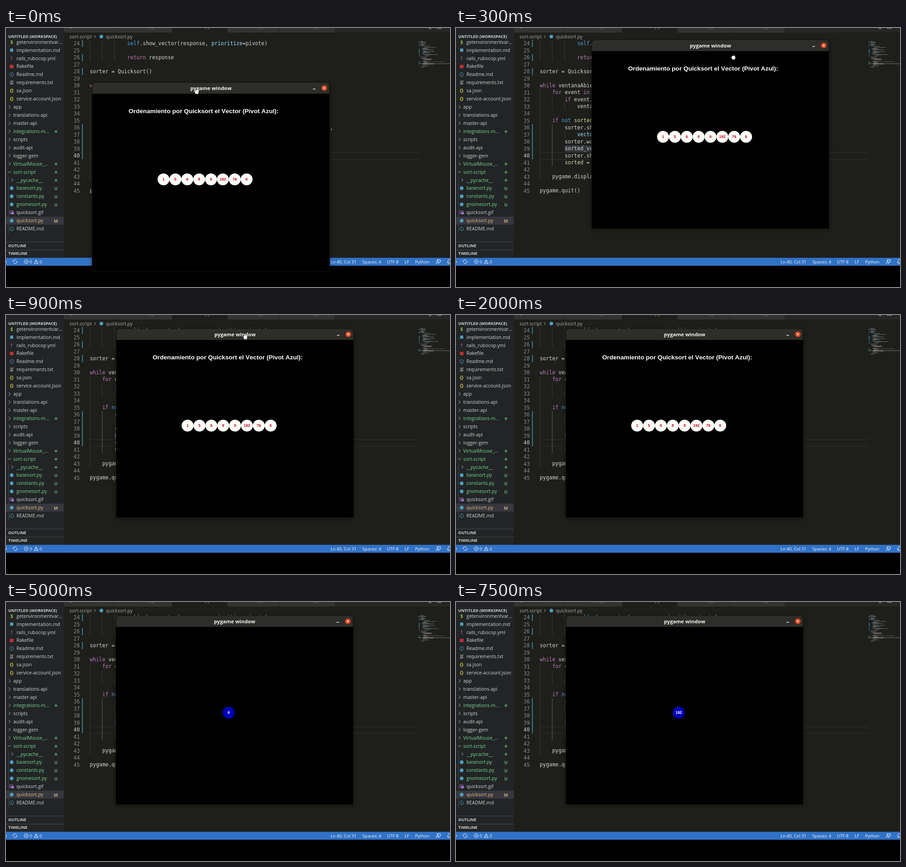
These frames come from a looping animation (978 px wide and 572 px high, 8 s). An HTML page with a canvas:

```html
<!DOCTYPE html>
<html lang="es">
<head>
<meta charset="utf-8">
<title>Quicksort</title>
<style>
html, body { margin: 0; width: 978px; height: 572px; overflow: hidden; background: #000; }
canvas { display: block; }
</style>
</head>
<body>
<canvas id="stage" width="978" height="572"></canvas>
<script>
const W = 978, H = 572, LOOP = 8000;
const UI = '"Open Sans", "Noto Sans", sans-serif';
const MONO = '"DejaVu Sans Mono", monospace';
const SANS = '"Liberation Sans", Arial, sans-serif';
const CH = 6.87, LINE = 15.5, CODE_X = 184.5;
const stage = document.getElementById('stage').getContext('2d');
const back = document.createElement('canvas');
back.width = W;
back.height = H;
let g = back.getContext('2d');

function rect(x, y, w, h, color) {
  g.fillStyle = color;
  g.fillRect(x, y, w, h);
}
function disc(x, y, r, color) {
  g.fillStyle = color;
  g.beginPath();
  g.arc(x, y, r, 0, 7);
  g.fill();
}
function ring(x, y, r, color) {
  g.strokeStyle = color;
  g.lineWidth = 1;
  g.beginPath();
  g.arc(x, y, r, 0, 7);
  g.stroke();
}
function path(points, color, width = 1, close = false) {
  g.strokeStyle = color;
  g.lineWidth = width;
  g.beginPath();
  points.forEach(([x, y]) => g.lineTo(x, y));
  if (close) g.closePath();
  g.stroke();
}
function text(s, x, y, font, color, align = 'left') {
  g.font = font;
  g.fillStyle = color;
  g.textAlign = align;
  g.fillText(s, x, y);
}

// ---- Editor code: [line, indent, segments as "class|text"] ----
const INK = { k: '#b878b6', b: '#569cd6', v: '#9cdcfe', y: '#d5d5a6', s: '#c58a70', t: '#d2d2ce' };
const code = [
  [24, 12, 'b|self', 't|.show_vector(response, ', 'v|prioritize', 't|=pivote)'],
  [26, 12, 'k|return', 't| response'],
  [28, 0, 't|sorter = Quicksort()'],
  [30, 0, 'k|while', 't| ventanaAbierta:'],
  [31, 4, 'k|for', 't| event ', 'k|in', 't| pygame.event.get():'],
  [32, 8, 'k|if', 't| event.type == pygame.QUIT:'],
  [33, 12, 't|ventanaAbierta = ', 'b|False'],
  [35, 4, 'k|if', 't| ', 'b|not', 't| ', 'y|sorted', 't|:'],
  [36, 8, 't|sorter.show_text(', 's|"Ordenamiento por Quicksort el Vector (Pivot Azul):"', 't|,'],
  [37, 12, 'v|vector', 't|=vector)'],
  [38, 8, 't|sorter.wait()'],
  [39, 8, 't|sorted_vector = sorter.sort(vector)'],
  [40, 8, 't|sorter.show_vector(sorted_vector)'],
  [41, 8, 'y|sorted', 't| = ', 'b|True'],
  [43, 4, 't|pygame.display.update()'],
  [45, 0, 't|pygame.quit()']
];
const lineMid = n => 34 + LINE * (n - 24);

function guide(col, from, to, color = '#3b3c37') {
  rect(Math.round(CODE_X + col * CH) - 0.5, lineMid(from) - LINE / 2, 1, LINE * (to - from + 1), color);
}

function drawMinimap() {
  const top = 28, step = 1.32;
  rect(909, 77.8, 69, 2, '#4a4b47');
  let seed = 5;
  const rnd = () => (seed = seed * 16807 % 2147483647) / 2147483647;
  for (let n = 1; n < 24; n++) {
    if (n % 6 === 4) continue;
    const indent = n < 9 ? 0 : 4 + 4 * Math.floor(rnd() * 3);
    rect(913 + indent * 0.68, top + n * step, 6 + rnd() * (n < 9 ? 8 : 22), 0.8, n % 4 ? '#777c7b' : '#54788c');
  }
  g.globalAlpha = 0.55;
  for (const [n, indent, ...parts] of code) {
    let x = 913 + indent * 0.68;
    for (const p of parts) {
      const w = (p.length - 2) * 0.68;
      rect(x, top + (n - 1) * step, w, 0.8, INK[p[0]]);
      x += w;
    }
  }
  g.globalAlpha = 1;
  [[30, 4], [37, 3], [46, 10], [58, 2], [61, 2], [74, 6]].forEach(([y, h]) => rect(909.5, y, 1.5, h, '#3b7d97'));
}

function drawEditor() {
  rect(128, 0, W - 128, 508, '#1e1f1b');
  rect(128, 0, W - 128, 10, '#262723');
  rect(128, 0, 237, 10, '#32332f');
  rect(487, 0, 237, 10, '#32332f');
  rect(366, 0, 121, 10, '#1e1f1b');
  [238, 365, 487, 602, 724].forEach(x => rect(x, 0, 1, 10, '#232420'));
  [[316, '#5d9c74'], [438, '#a89674'], [556, '#5d9c74'], [677, '#5d9c74']]
    .forEach(([x, c]) => text('py', x, -0.5, '10.4px ' + UI, c));
  disc(143, -2, 3, '#519aba');
  path([[931, 0], [934, 2], [937, 1]], '#bbb');
  path([[950, 0], [950, 1], [959, 1], [959, 0]], '#aaa');

  text('sort-script', 140, 22.6, '10.35px ' + UI, '#a9a9a5');
  path([[194, 16], [197.5, 19], [194, 22]], '#a9a9a5');
  disc(210, 19, 4, '#519aba');
  text('quicksort.py', 220, 22.6, '10.35px ' + UI, '#a9a9a5');

  rect(184, 275, 725, 1, '#30312d');
  rect(184, 289.5, 725, 1, '#30312d');
  rect(CODE_X + 8 * CH, lineMid(39) - 7.5, 13 * CH, 15, '#34363a');
  [0, 4, 8].forEach(c => guide(c, 24, 26));
  guide(0, 31, 43);
  guide(4, 32, 33);
  guide(8, 33, 33);
  guide(4, 36, 41, '#62635d');
  guide(8, 37, 37);
  [[24, 24], [26, 26], [28, 28], [36, 40]].forEach(([a, b]) =>
    rect(167.3, lineMid(a) - 7.5, 2, LINE * (b - a + 1), '#3a7d92'));

  const font = '11.41px ' + MONO;
  for (let n = 24; n <= 45; n++)
    text(n, 162.5, lineMid(n) + 4, font, n === 40 ? '#c8c8c4' : '#868782', 'right');
  for (const [n, indent, ...parts] of code) {
    let col = indent;
    for (const p of parts) {
      text(p.slice(2), CODE_X + col * CH, lineMid(n) + 3.7, font, INK[p[0]]);
      col += p.length - 2;
    }
  }
  drawMinimap();
}

// ---- Sidebar rows: icon, label, state ----
const rows = [
  ['$', 'getenvironmentvar...'], ['md', 'implementation.md'], ['!', 'rails_rubocop.yml'],
  ['rb', 'Rakefile'], ['i', 'Readme.md'], ['txt', 'requirements.txt'],
  ['{}', 'sa.json'], ['{}', 'service-account.json'],
  ['>', 'app'], ['>', 'translations-api'], ['>', 'master-api'], ['>', 'integrations-m...', '*'],
  ['>', 'scripts'], ['>', 'audit-api'], ['>', 'logger-gem'], ['>', 'VirtualMouse_...', '*'],
  ['v', 'sort-script', '*'], ['>>', '__pycache__', '*'],
  ['py', 'basesort.py', 'U'], ['py', 'constants.py', 'U'], ['py', 'gnomesort.py', 'U'],
  ['gif', 'quicksort.gif'], ['py', 'quicksort.py', 'M'], ['i', 'README.md']
];
const glyphs = { '$': '#8dc149', '!': '#a074c4', '{}': '#cbcb41' };

function drawIcon(kind, y) {
  const grey = '#c0c2c2';
  if (glyphs[kind]) text(kind, 12.5, y + 3.8, 'bold 10px ' + UI, glyphs[kind], 'center');
  else if (kind === 'py') disc(12.5, y, 4.2, '#519aba');
  else if (kind === 'md') rect(9, y - 3.5, 7, 7, '#519aba');
  else if (kind === 'rb') rect(8.5, y - 3.5, 8, 7.5, '#c0303a');
  else if (kind === 'i') {
    ring(12.5, y, 4.3, '#519aba');
    rect(12, y - 2.5, 1, 1, '#519aba');
    rect(12, y - 0.5, 1, 3, '#519aba');
  } else if (kind === 'txt') {
    [-3.5, -1, 1.5, 3.5].forEach((d, i) => rect(9, y + d - 0.5, i % 2 ? 6 : 8, 1, grey));
  } else if (kind === 'gif') {
    g.strokeStyle = '#a074c4';
    g.lineWidth = 1;
    g.strokeRect(8.5, y - 3.5, 7, 5.5);
    rect(11, y - 1, 6.5, 5, '#a074c4');
  } else if (kind === 'v') path([[4, y - 1.5], [7.5, y + 2], [11, y - 1.5]], grey);
  else {
    const x = kind === '>>' ? 12 : 6;
    path([[x, y - 3.5], [x + 3.5, y], [x, y + 3.5]], grey);
  }
}

function drawSidebar() {
  rect(0, 0, 128, 508, '#222425');
  g.save();
  g.beginPath();
  g.rect(0, 27, 128, 445);
  g.clip();
  rows.forEach(([icon, label, state], i) => {
    const y = 31 + i * 17.93;
    const color = state === 'M' ? '#e2c08d' : state ? '#78d895' : '#d2d4d4';
    if (state === 'M') rect(0, y - 8.8, 127, 17.6, '#37373d');
    drawIcon(icon, y);
    const folder = icon === '>' || icon === 'v';
    text(label, folder ? 16 : 23, y + 3.7, '10.4px ' + UI, color);
    if (state === '*') disc(110, y + 0.5, 3, '#46805a');
    else if (state) text(state, 110, y + 4.2, '600 9.5px ' + UI, color, 'center');
  });
  rect(5, 328, 1, 126, '#44474a');
  g.restore();
  const head = 'bold 9px ' + UI;
  text('UNTITLED (WORKSPACE)', 5, 22.3, head, '#d2d4d4');
  rect(0, 472, 127, 1, '#46494a');
  rect(0, 490, 127, 1, '#46494a');
  text('OUTLINE', 5, 483.8, head, '#d2d4d4');
  text('TIMELINE', 5, 501.3, head, '#d2d4d4');
}

function drawStatus() {
  const white = '#f4f8fc', font = '9.6px ' + UI;
  rect(0, 507.5, W, 17.5, '#3172c6');
  rect(0, 514, 1, 5, white);
  g.strokeStyle = white;
  g.lineWidth = 1;
  [0.2, Math.PI + 0.2].forEach(a => {
    g.beginPath();
    g.arc(20, 516, 4, a, a + 2.5);
    g.stroke();
  });
  path([[14, 516], [16, 514], [18, 516]], white);
  path([[22, 516], [24, 518], [26, 516]], white);
  ring(44.5, 516, 4.4, white);
  path([[42.8, 514.3], [46.2, 517.7]], white);
  path([[46.2, 514.3], [42.8, 517.7]], white);
  text('0', 52, 519.8, font, white);
  path([[66.5, 511.8], [71, 520], [62, 520]], white, 1, true);
  rect(66, 514.5, 1, 3, white);
  text('0', 74, 519.8, font, white);
  [['Ln 40, Col 31', 715], ['Spaces: 4', 785], ['UTF-8', 839], ['LF', 878], ['Python', 901]]
    .forEach(([s, x]) => text(s, x, 519.8, font, white));
  path([[949, 512], [957, 512], [957, 517], [954, 517], [953, 519]], white);
  ring(950.5, 515, 1.6, white);
  path([[947.5, 521], [948, 518.5], [953, 518.5], [953.5, 521]], white);
  path([[972, 518.5], [973.5, 516], [974, 513], [976, 511.5], [978, 511.5]], white);
  path([[972, 518.5], [978, 518.5]], white);
  path([[975, 520], [977, 521]], white);
}

// ---- Floating window ----
const vector = [1, 5, 6, 8, 9, 192, 76, 6];
const pivots = [[2200, 1], [3300, 5], [4300, 6], [5300, 8], [6300, 9], [7300, 192]];
const windowPath = [
  [0, 190, 121], [100, 254, 80], [200, 310, 44], [300, 299, 27], [400, 268, 23],
  [600, 254, 29], [700, 250, 30], [800, 246, 30], [900, 243, 31], [1000, 242, 31]
];
const cursorPath = [
  [0, 420, 141], [100, 502, 105], [200, 586, 80], [300, 611, 65], [400, 556, 46],
  [600, 537, 41], [700, 533, 43], [800, 529, 46], [900, 527, 49], [1000, 526, 51],
  [1200, 540, 88], [1300, 566, 170]
];
const CURSOR_GONE = 1400;
const at = (keys, t) => keys.filter(k => k[0] <= t).pop();

function ball(x, y, n, fill, ink) {
  disc(x, y, 13.1, fill);
  text(n, x, y + 3.1, 'bold 8.5px ' + SANS, ink, 'center');
}

function drawWindow(t) {
  const [, x, y] = at(windowPath, t);
  const w = 522.5, h = 416;
  g.save();
  g.shadowColor = 'rgba(0,0,0,.5)';
  g.shadowBlur = 10;
  g.shadowOffsetY = 2;
  g.fillStyle = '#2d2d29';
  g.beginPath();
  g.roundRect(x, y, w, h, [6, 6, 0, 0]);
  g.fill();
  g.restore();
  g.strokeStyle = '#1a1a19';
  g.lineWidth = 1.6;
  g.stroke();
  rect(x + 5, y + 0.5, w - 10, 1, '#383834');
  rect(x, y + 24, w, h - 24, '#000');
  text('pygame window', x + 261.5, y + 15.8, 'bold 11.2px ' + UI, '#f0f0ec', 'center');
  rect(x + 486, y + 13, 5.5, 1.5, '#e4e4e0');
  disc(x + 511, y + 11.5, 6.3, '#d9431d');
  path([[x + 508.7, y + 9.2], [x + 513.3, y + 13.8]], '#fff', 1.2);
  path([[x + 513.3, y + 9.2], [x + 508.7, y + 13.8]], '#fff', 1.2);

  const step = at(pivots, t);
  if (step) {
    ball(x + 248.5, y + 213.3, step[1], '#0000b9', '#fff');
    return;
  }
  text('Ordenamiento por Quicksort el Vector (Pivot Azul):', x + 80, y + 67, 'bold 13.65px ' + SANS, '#fff');
  vector.forEach((n, i) => ball(x + 157 + i * 26.14, y + 213.3, n, '#fffffa', '#c0051c'));
}

function drawCursor(t) {
  if (t >= CURSOR_GONE) return;
  const [, x, y] = at(cursorPath, t);
  g.fillStyle = '#fff';
  g.strokeStyle = '#222';
  g.lineWidth = 0.8;
  g.beginPath();
  g.roundRect(x - 3.2, y - 3, 7.2, 7.5, 2);
  g.moveTo(x - 2.5, y + 2.5);
  g.lineTo(x - 5, y - 0.5);
  g.lineTo(x - 4, y - 1.5);
  g.lineTo(x - 2.5, y);
  g.stroke();
  g.fill();
  [-1.2, 0.6, 2.3].forEach(d => disc(x + d, y - 3, 1.1, '#fff'));
}

rect(0, 0, W, H, '#000');
drawEditor();
drawSidebar();
drawStatus();

g = stage;
g.fontKerning = 'none';
const start = performance.now();
function frame() {
  const t = (performance.now() - start) % LOOP;
  g.drawImage(back, 0, 0);
  drawWindow(t);
  drawCursor(t);
  requestAnimationFrame(frame);
}
frame();
</script>
</body>
</html>
```
